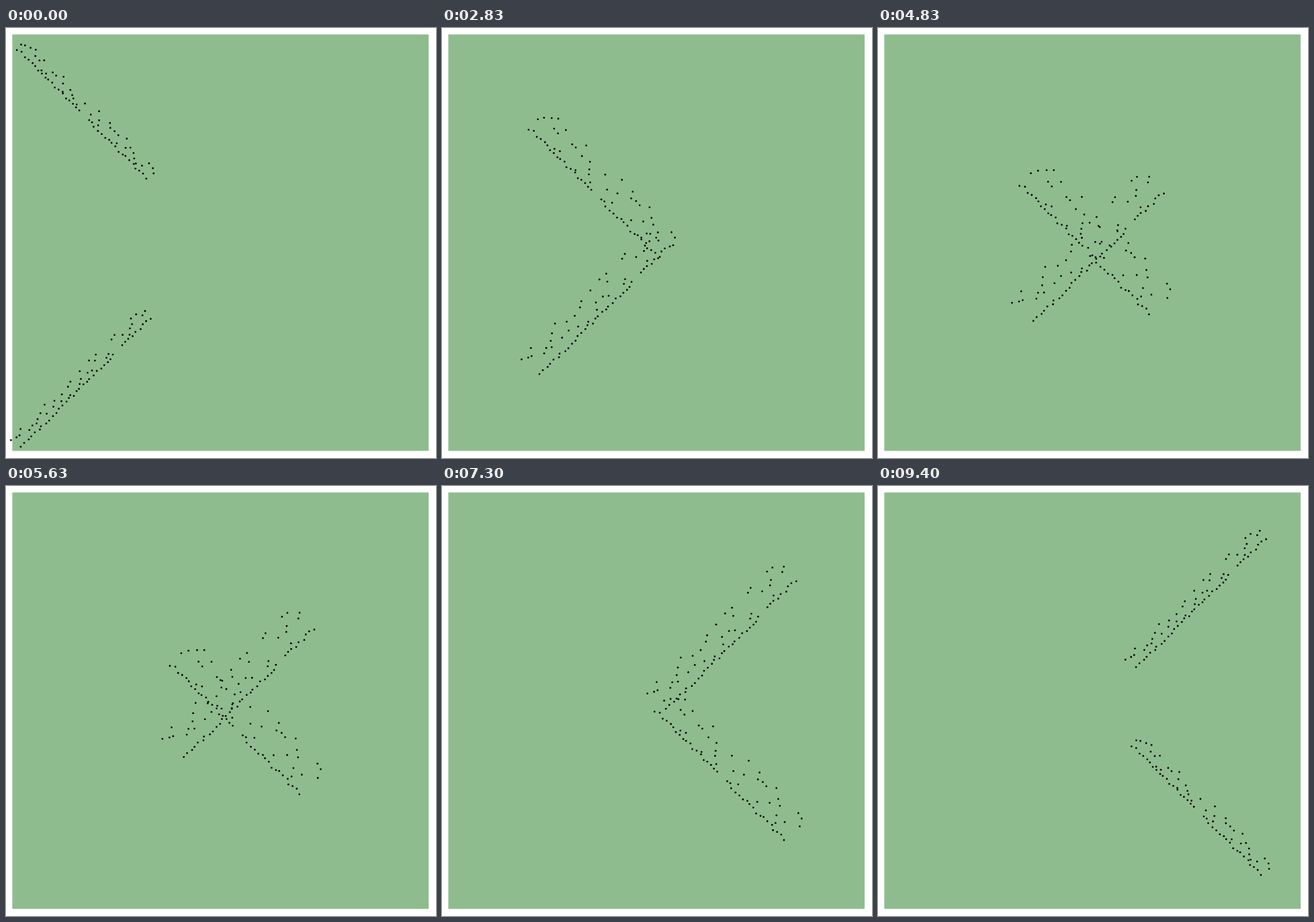
Animation, 640 px wide and 640 px high, one loop 9460 ms. Source, as an HTML page with a canvas:

```html
<!DOCTYPE html>
<html lang="en">
<head>
<meta charset="utf-8">
<title>Crossing swarms</title>
<style>
  html, body { margin: 0; width: 100%; height: 100%; overflow: hidden; background: #fff; }
  canvas { display: block; width: 640px; height: 640px; }
</style>
</head>
<body>
<canvas id="stage" width="640" height="640"></canvas>
<script>
const ctx = document.getElementById('stage').getContext('2d');
const LOOP = 9460, LAST = 9400, STEP = 1000 / 30;
const SPEED = 0.0413, BRAKE_AT = 8200, TRAVEL = 360;
const DOTS = 75, LENGTH = 190, HALF_WIDTH = 8, GAP = 8;

const mix = (a, b, k) => a + (b - a) * k;
const smooth = k => k * k * (3 - 2 * k);

function seeded(seed) {
  return () => {
    seed = (seed + 0x6D2B79F5) | 0;
    let n = Math.imul(seed ^ (seed >>> 15), seed | 1);
    n ^= n + Math.imul(n ^ (n >>> 7), n | 61);
    return ((n ^ (n >>> 14)) >>> 0) / 4294967296;
  };
}

// A diagonal band: every other dot lines the lower edge, the rest scatter across.
// heading is the vertical direction; the outward side is (heading, -1).
function makeSwarm({ x, y, heading, gapAt, edgeDrift, outerDrift, seed }) {
  const random = seeded(seed);
  const dots = Array.from({ length: DOTS }, (_, i) => {
    const u = (i + random() * .9) / DOTS;
    const along = u * LENGTH + (u > gapAt ? GAP : 0);
    const across = i % 2 ? mix(0, .15, random()) : mix(.2, 1, random());
    const side = mix(-HALF_WIDTH, HALF_WIDTH, across);
    return {
      x: x + along + heading * side,
      y: y + heading * along - side,
      drift: mix(edgeDrift, outerDrift, smooth(across))
    };
  });
  return { dots, heading };
}

const swarms = [
  makeSwarm({ x: 21, y: 22, heading: 1, gapAt: .5, edgeDrift: -6, outerDrift: 18, seed: 4 }),
  makeSwarm({ x: 13, y: 620, heading: -1, gapAt: .74, edgeDrift: -10, outerDrift: 9, seed: 9 })
];

// Steady flight, then an exponential stop
function travelled(t) {
  if (t < BRAKE_AT) return SPEED * t;
  const rest = TRAVEL - SPEED * BRAKE_AT;
  return TRAVEL - rest * Math.exp(-(t - BRAKE_AT) * SPEED / rest);
}

// The swarms fan out sideways on the way and close up on arrival
const fanned = t => Math.sin(Math.PI * Math.pow(t / 9600, 1.15));

function draw(t) {
  ctx.fillStyle = '#fff';
  ctx.fillRect(0, 0, 640, 640);
  ctx.fillStyle = '#8fbc8f';
  ctx.fillRect(9.4, 9.6, 619.6, 619.8);
  ctx.fillStyle = '#000';
  const way = travelled(t), fan = fanned(t);
  for (const { dots, heading } of swarms) {
    for (const dot of dots) {
      const side = dot.drift * fan;
      const x = dot.x + way * 1.01 + heading * side;
      const y = dot.y + heading * way * .99 - side;
      ctx.beginPath();
      ctx.arc(x, y, 1.4, 0, Math.PI * 2);
      ctx.fill();
    }
  }
}

const start = performance.now();
function tick() {
  const t = (performance.now() - start) % LOOP;
  draw(Math.min(LAST, Math.floor(t / STEP) * STEP));
  requestAnimationFrame(tick);
}
tick();
</script>
</body>
</html>
```
